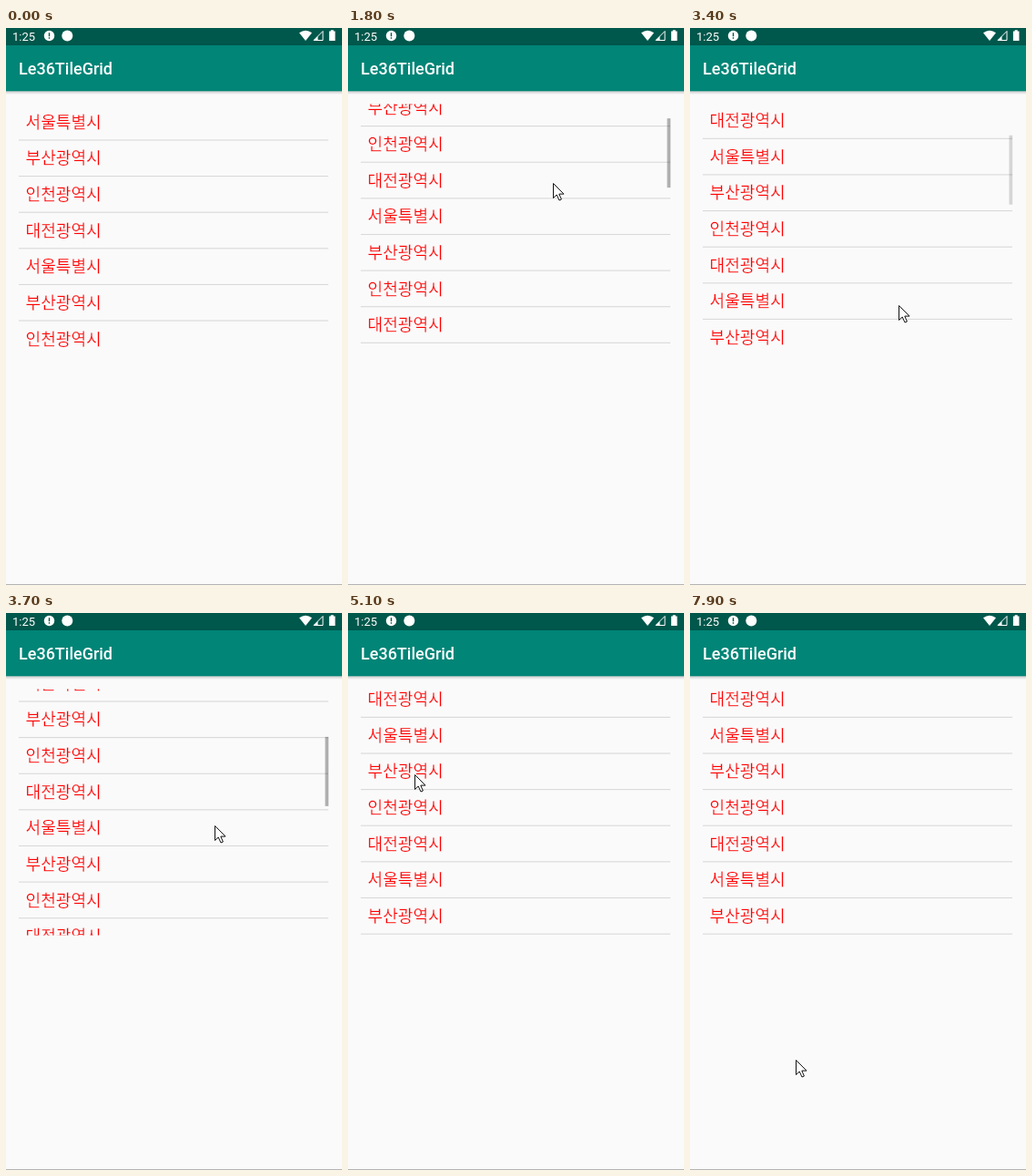
An HTML page for the animation above (8 s loop, 369 by 611 pixels).

```html
<!DOCTYPE html>
<html lang="ko">
<head>
<meta charset="utf-8">
<title>List</title>
<style>
html, body { margin: 0; width: 369px; height: 611px; overflow: hidden; background: #fafafa; }
svg { display: block; }
.ui { font-family: Roboto, sans-serif; fill: #fff; }
/* A hairline in the background colour thins the strokes of the letters. */
.ko text { font-family: "Noto Sans CJK KR", "Noto Sans CJK", sans-serif; stroke-width: .25px; }
#rows text { font-size: 18.1px; fill: #f00; stroke: #fafafa; }
#toast text { font-size: 12.6px; fill: #333; stroke: #eee; text-anchor: middle; }
</style>
</head>
<body>
<svg width="369" height="611" viewBox="0 0 369 611">
  <defs>
    <clipPath id="view"><rect x="14" y="83.5" width="341" height="270"/></clipPath>
    <linearGradient id="shade" x2="0" y2="1">
      <stop stop-color="#000" stop-opacity=".2"/>
      <stop offset="1" stop-color="#000" stop-opacity="0"/>
    </linearGradient>
  </defs>

  <rect width="369" height="611" fill="#fafafa"/>
  <rect y="69" width="369" height="4" fill="url(#shade)"/>
  <rect y="19" width="369" height="50.3" fill="#008577"/>
  <rect width="369" height="19" fill="#00574b"/>
  <rect y="610" width="369" height="1" fill="#b4b4b4"/>

  <g class="ui">
    <text x="7" y="13.5" font-size="13">1:25</text>
    <text x="14" y="51" font-size="18" font-weight="500">Le36TileGrid</text>
    <circle cx="47.5" cy="8.5" r="5.7"/>
    <path d="M46.8 5.3h1.4v4h-1.4zM46.8 10.3h1.4v1.4h-1.4z" fill="#00574b"/>
    <circle cx="67.3" cy="8.5" r="6"/>
    <path d="M322 5.3Q329 0 336 5.3L329 14z"/>
    <path d="M348 3.5V13.5H338z" fill="none" stroke="#fff"/>
    <path d="M342.5 9V13.5H338z"/>
    <path d="M356.7 2.3h3v1.3h1.8v10.4h-6.6V3.6h1.8z"/>
  </g>

  <g clip-path="url(#view)">
    <rect id="press" x="14" y="154" width="340" height="39.5" fill="#000"/>
    <g id="rows" class="ko"></g>
    <rect id="thumb" x="350.5" width="3.7" height="76" fill="#000"/>
  </g>

  <g id="toast" class="ko">
    <rect x="134" y="545" width="100.5" height="44" rx="21" fill="#eee"/>
    <text x="184" y="571.5">부산광역시</text>
  </g>

  <path id="cursor" d="M.5.5V16.5L4.2 13 7 19 9.4 18 6.8 12.1H12z" fill="#fff" stroke="#111"/>
</svg>
<script>
const LOOP = 8000, STEP = 100, ENTER = 700;
const PITCH = 39.62, COUNT = 24, VIEW = 270, SLOP = 10, GAIN = 1.057;
const cities = ['서울특별시', '부산광역시', '인천광역시', '대전광역시'];

const $ = id => document.getElementById(id);
const clamp = v => Math.min(1, Math.max(0, v));
const easeOut = u => Math.sin(u * Math.PI / 2);
const easeInOut = u => (1 - Math.cos(u * Math.PI)) / 2;
const pulse = (t, from, to, fade) => clamp(Math.min(t - from, to - t) / fade);

// Pointer strokes; a drag also pulls the list along.
const strokes = [
  { from: ENTER, to: 1100, x: 212, y: 232 },
  { from: 1100, to: 2500, x: 238, y: 108, drag: true },
  { from: 2600, to: 3200, x: 229, y: 304 },
  { from: 3430, to: 4400, x: 230, y: 137.5, drag: true, easeY: easeOut },
  { from: 4500, to: 5100, x: 73, y: 177 },
  { from: 5600, to: 6000, x: 80, y: 199 },
  { from: 6000, to: 7200, x: 213, y: 591, easeX: easeOut },
  { from: 7200, to: 7900, x: 116, y: 490 }
];

function pose(t) {
  let x = 349, y = 262, scroll = 0;
  for (const s of strokes) {
    const u = clamp((t - s.from) / (s.to - s.from)), startY = y;
    x += (s.x - x) * (s.easeX || easeInOut)(u);
    y += (s.y - y) * (s.easeY || easeInOut)(u);
    if (s.drag) scroll += GAIN * Math.max(0, startY - SLOP - y);
    if (u < 1) break;
  }
  return { x: Math.round(x), y: Math.round(y), scroll };
}

$('rows').innerHTML = Array.from({ length: COUNT }, (_, i) => {
  const y = i * PITCH;
  return `<text x="21.5" y="${109.8 + y}">${cities[i % 4]}</text>
    <rect x="14" y="${122.4 + y}" width="340" height="1.1" fill="#d9d9d9"/>`;
}).join('');

const set = (id, name, value) => $(id).setAttribute(name, value);

function draw(now) {
  const t = Math.floor(now % LOOP / STEP) * STEP;
  const { x, y, scroll } = pose(t);
  const bar = pulse(t, 1200, 3100, 200) + pulse(t, 3300, 5000, 200) + pulse(t, 5400, 6900, 200);
  set('rows', 'transform', `translate(0 ${-scroll})`);
  set('thumb', 'y', 83.5 + scroll * VIEW / (COUNT * PITCH));
  set('thumb', 'opacity', bar * .3);
  set('press', 'opacity', pulse(t, 5400, 5900, 200) * .07);
  set('toast', 'opacity', pulse(t, 5600, 7900, 300));
  set('cursor', 'transform', `translate(${x} ${y})`);
  set('cursor', 'visibility', t < ENTER ? 'hidden' : 'visible');
}

const start = performance.now();
function tick() {
  draw(performance.now() - start);
  requestAnimationFrame(tick);
}
tick();
</script>
</body>
</html>
```
